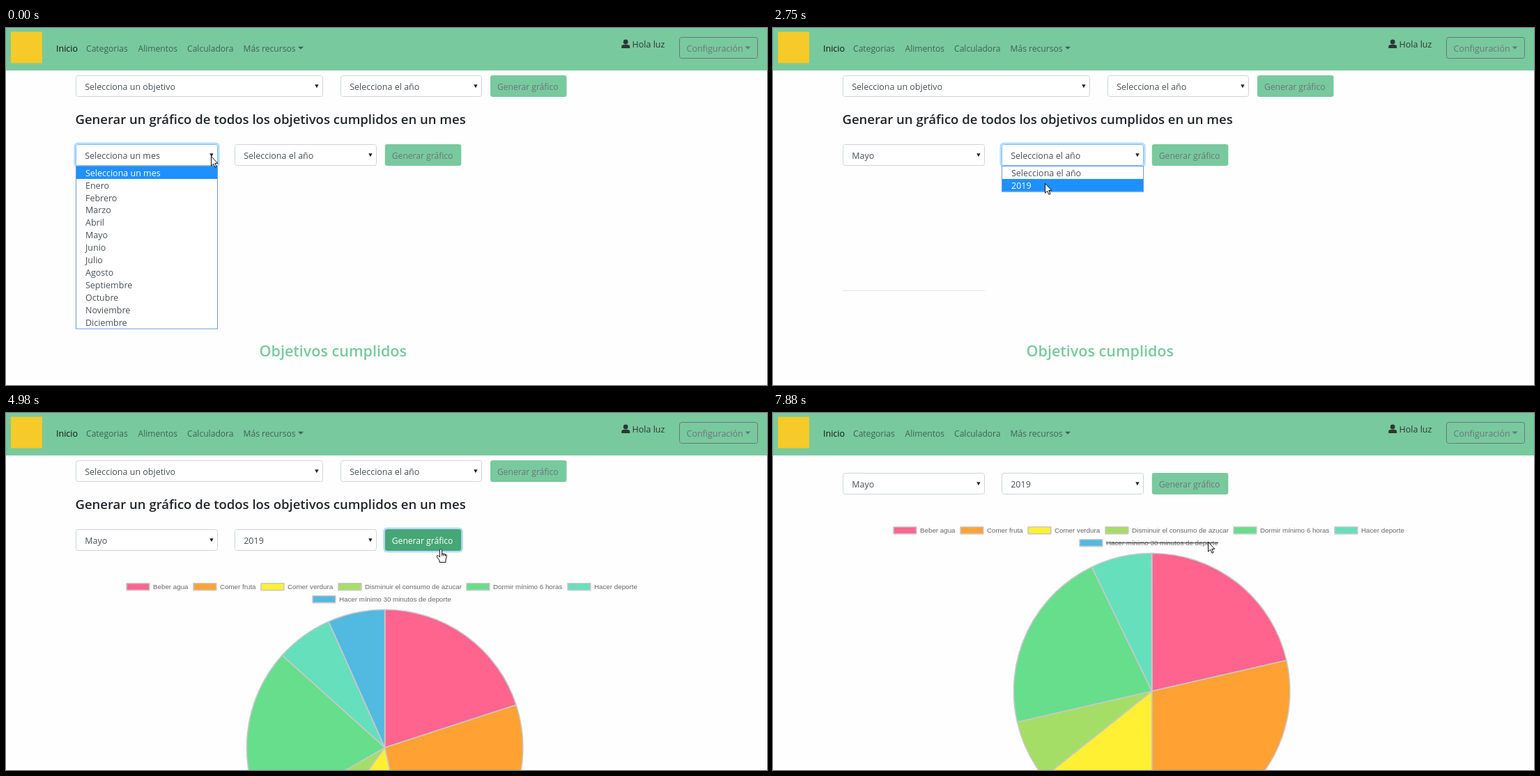
An HTML page that plays this animation: 1092 by 513 pixels, repeating every 8000 ms.

```html
<!DOCTYPE html>
<html lang="es">
<head>
<meta charset="utf-8">
<title>Objetivos</title>
<style>
html, body { margin: 0; width: 100%; height: 100%; overflow: hidden; background: #fefefe; }
svg { display: block; width: 100vw; height: 100vh; }
text { font-family: "Open Sans", "Noto Sans", sans-serif; font-size: 12.5px; white-space: pre; }
.title { font-weight: 600; font-size: 18.5px; }
.big { font-weight: 600; font-size: 21.55px; }
.small { font-family: "Liberation Sans", Arial, sans-serif; font-size: 9.78px; }
.btn { font-size: 12.1px; }
</style>
</head>
<body>
<svg id="stage" viewBox="0 0 1092 513"></svg>
<script>
const LOOP = 8000, GREEN = '#79c99e', GREY = '#495057', MUTED = '#6c757d', SCROLL = 81;
const stage = document.getElementById('stage');

const STAMPS = [0, 120, 260, 390, 520, 650, 780, 970, 1400, 1550, 1670, 1790, 2070, 2360, 2490, 2620, 2750,
  3050, 3180, 3310, 3440, 3570, 3730, 3900, 4050, 4170, 4300, 4430, 4560, 4710, 4840, 4970, 5100, 5230, 5380,
  6080, 6210, 6340, 6600, 7190, 7320, 7460, 7600, 7740, 7880];

// Pointer stops: time, x, y
const PATH = [[0, 294, 184], [970, 269, 291], [1400, 269, 291], [1790, 388, 184], [2230, 388, 184],
  [2750, 390, 223], [2950, 390, 223], [3730, 624, 195], [5950, 624, 195], [6600, 624, 185], [LOOP, 624, 185]];

const MONTHS = ['Selecciona un mes', 'Enero', 'Febrero', 'Marzo', 'Abril', 'Mayo', 'Junio', 'Julio',
  'Agosto', 'Septiembre', 'Octubre', 'Noviembre', 'Diciembre'];
const YEARS = ['Selecciona el año', '2019'];

// Goals: label, count, colour, legend x, legend y
const GOALS = [
  ['Beber agua', 3, '#ff648f', 173, 249.5],
  ['Comer fruta', 4, '#ffa233', 269, 249.5],
  ['Comer verdura', 2, '#fff033', 366, 249.5],
  ['Disminuir el consumo de azucar', 1, '#a5de66', 477, 249.5],
  ['Dormir mínimo 6 horas', 3, '#66de8c', 661, 249.5],
  ['Hacer deporte', 1, '#66dfbc', 806, 249.5],
  ['Hacer mínimo 30 minutos de deporte', 1, '#52b9e0', 440, 267.5]
];

const clamp = v => Math.min(1, Math.max(0, v));
const easeOut = v => 1 - (1 - clamp(v)) ** 4;
const smooth = v => v * v * (3 - 2 * v);
const mix = (a, b, k) => a + (b - a) * k;

function pointer(t) {
  const i = PATH.findIndex(p => p[0] > t), [t0, x0, y0] = PATH[i - 1], [t1, x1, y1] = PATH[i];
  const k = smooth((t - t0) / (t1 - t0));
  return [mix(x0, x1, k), mix(y0, y1, k)];
}

const text = (x, y, s, fill = GREY, cls = '') => `<text x="${x}" y="${y}" fill="${fill}" class="${cls}">${s}</text>`;
const rect = (x, y, w, h, fill, more = '') => `<rect x="${x}" y="${y}" width="${w}" height="${h}" fill="${fill}" ${more}/>`;
const caret = (x, y, fill) => `<path d="M${x} ${y}h8l-4 4z" fill="${fill}"/>`;
const ring = (x, y, w) => rect(x - 1.3, y - 1.3, w + 2.6, 33.6, 'none', 'rx="4.5" stroke="#007bff" stroke-opacity=".28" stroke-width="2.6"');

function select(x, y, w, label, focus) {
  return (focus ? ring(x, y, w) : '') +
    rect(x + .5, y + .5, w - 1, 30, '#fff', `rx="3" stroke="${focus ? '#80bdff' : '#ced4da'}"`) +
    text(x + 13.2, y + 20.5, label) +
    `<path d="M${x + w - 11.8} ${y + 13.3}h5.4l-2.7 5z" fill="#222"/>`;
}

function list(x, w, items, y) {
  const pitch = 17.9, active = Math.max(0, Math.floor((y - 199) / pitch));
  return rect(x + .5, 198.5, w - 1, items.length * pitch + 1, '#fff', 'stroke="#6c9bdc"') +
    items.map((s, i) => (i === active ? rect(x + 1, 199 + i * pitch, w - 2, pitch, '#1e90ff') : '') +
      text(x + 14, 212.7 + i * pitch, s, i === active ? '#fff' : GREY)).join('');
}

function button(x, y, hover = 0, focus = false) {
  const tone = (a, b) => `rgb(${a.map((v, i) => Math.round(mix(v, b[i], hover)))})`;
  return (focus ? ring(x, y, 109.5) : '') +
    rect(x, y, 109.5, 31, tone([121, 201, 158], [70, 166, 118]), 'rx="3.3"') +
    text(x + 10, y + 20.5, 'Generar gráfico', tone([108, 117, 125], [255, 255, 255]), 'btn');
}

function chart(t) {
  const grown = easeOut((t - 4004) / 924), hidden = easeOut((t - 7160) / 924);
  const cx = 543.6, cy = 480.7, r = 198.2, line = 'stroke="#c8c8c8" stroke-width="1.6" stroke-linejoin="bevel"';
  const point = a => `${cx + r * Math.sin(a)} ${cy - r * Math.cos(a)}`;
  let angle = 0, legend = '', pie = '';
  GOALS.forEach(([label, count, colour, x, y], i) => {
    const last = i === GOALS.length - 1;
    const share = mix(count / 15, last ? 0 : count / 14, hidden);
    const end = angle + share * grown * 2 * Math.PI;
    pie += `<path d="M${cx} ${cy}L${point(angle)}A${r} ${r} 0 0 1 ${point(end)}Z" fill="${colour}" ${line}/>`;
    angle = end;
    legend += rect(x, y - 4.7, 32.8, 9.8, colour, line) + text(x + 38, y + 3.2, label, '#666', 'small');
    if (last && t >= 7190) legend += rect(x + 38, y - .7, 161, 1.5, '#666');
  });
  return legend + pie;
}

function header() {
  const soft = '#3d6550', dark = '#2c3733';
  return rect(0, 0, 1092, 61, GREEN) + rect(7, 5.5, 45, 45, '#f6ca28') +
    text(72, 33.5, 'Inicio', '#0c1410') +
    [[115, 'Categorias'], [189.5, 'Alimentos'], [260, 'Calculadora'], [340.5, 'Más recursos']]
      .map(([x, s]) => text(x, 33.5, s, soft, 'btn')).join('') + caret(419, 26.7, soft) +
    `<g fill="${dark}"><circle cx="889.2" cy="20" r="3.4"/><path d="M883.2 29v-2q0-3 3.2-3h5.6q3.2 0 3.2 3v2z"/></g>` +
    text(898.5, 27.7, 'Hola luz', dark) +
    rect(966.5, 13.5, 112, 30, 'none', `rx="3" stroke="${MUTED}"`) +
    text(976.5, 33.5, 'Configuración', MUTED) + caret(1060.5, 26.5, MUTED);
}

function cursor([x, y], hand) {
  const shape = hand
    ? '<path d="M-1.6 1.8Q0-.8 1.6 1.8V7L6.6 8Q8.6 8.6 8.3 11L7 16V19.5H-2V17L-5.8 11.6Q-6 9.4-3.9 9.8L-1.6 12Z"/><path d="M1.6 7v3.5M4 7.6v3M6.4 8v3"/>'
    : '<path d="M.5 .5V14.2L3.7 11.2L5.9 16.3L8 15.4L5.8 10.4H9.8Z"/>';
  return `<g transform="translate(${x} ${y})" fill="#fff" stroke="#111" stroke-linejoin="round">${shape}</g>`;
}

function draw(t) {
  const pos = pointer(t), charted = t >= 4050;
  const hand = pos[0] > 560 && t < 5230;
  const hover = hand ? 1 : t >= 5230 && t < 5380 ? .4 : 0;
  let page = select(100, 68, 355, 'Selecciona un objetivo') + select(480, 68, 203, YEARS[0]) + button(695, 68) +
    text(99.5, 137.5, 'Generar un gráfico de todos los objetivos cumplidos en un mes', '#212529', 'title') +
    select(100, 167, 204, MONTHS[t < 1400 ? 0 : 5], t < 2070) +
    select(328, 167, 204, YEARS[t < 3050 ? 0 : 1], t >= 2070 && t < 3900) +
    button(543.8, 167, hover, t >= 3900 && t < 7190);
  page += charted ? chart(t)
    : rect(100, 377, 204, 1, '#e4e4e4') + text(363.5, 472.3, 'Objetivos cumplidos', GREEN, 'big');
  if (t < 1400) page += list(100, 204, MONTHS, pos[1]);
  if (t >= 2070 && t < 3050) page += list(328, 204, YEARS, pos[1]);
  stage.innerHTML = rect(0, 0, 1092, 513, '#fefefe') +
    `<g transform="translate(0 ${t >= 5100 ? -SCROLL : 0})">${page}</g>` + header() + cursor(pos, hand);
}

let shown = -1;
function tick() {
  const now = performance.now() % LOOP;
  const t = STAMPS.filter(s => s <= now).pop();
  if (t !== shown) draw(shown = t);
  requestAnimationFrame(tick);
}
tick();
</script>
</body>
</html>
```
